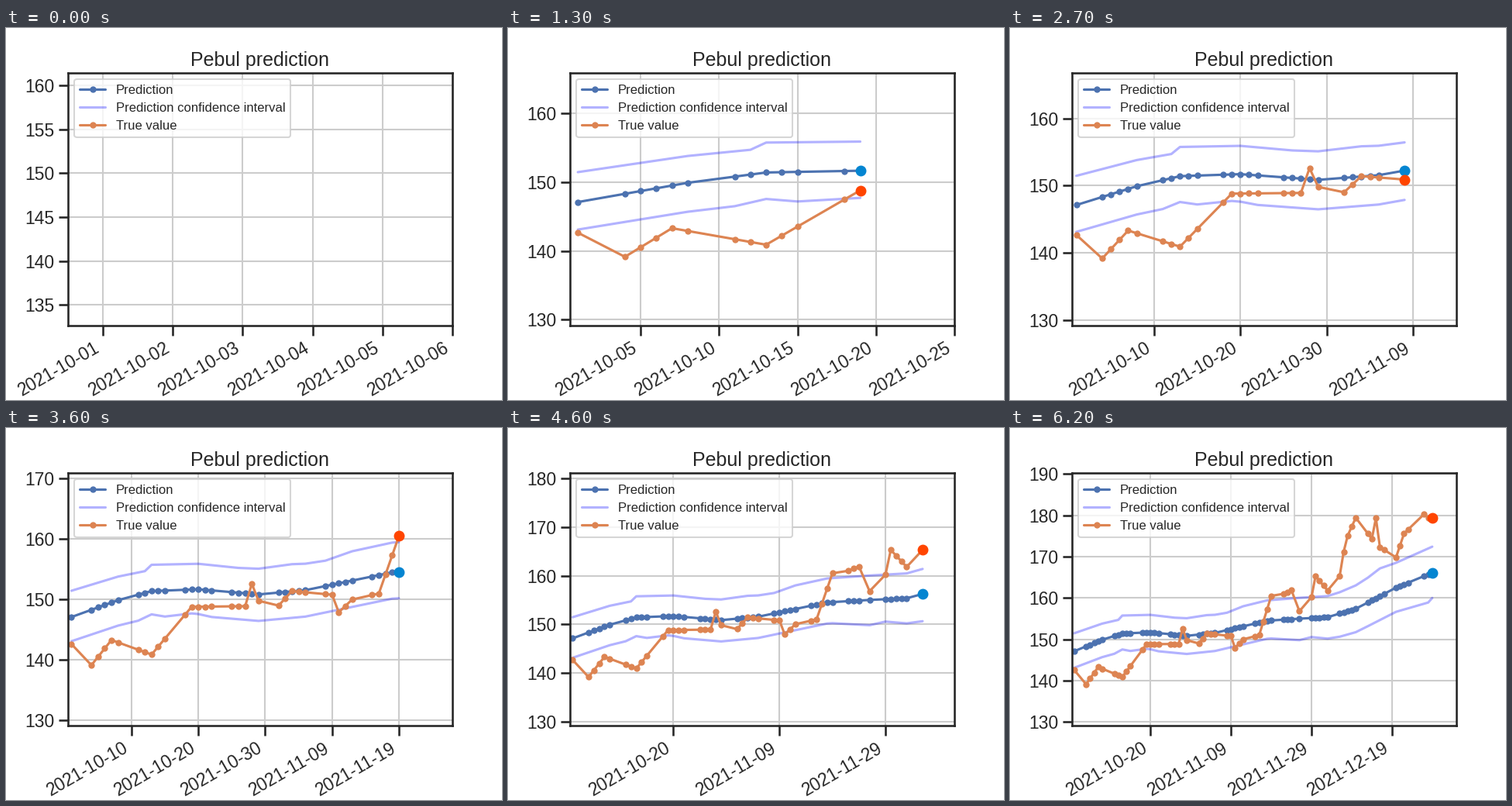
Write a matplotlib script that moves like this. It is 640 px wide and 480 px high and loops after 6.3 s.

```python
import numpy as np
import matplotlib.pyplot as plt
from matplotlib.animation import FuncAnimation
from matplotlib.dates import DateFormatter

INK = "0.15"
BLUE, ORANGE = "#4C72B0", "#DD8452"
N_FRAMES = 63

plt.rcParams.update({
    "font.family": "Liberation Sans",
    "text.color": INK,
    "axes.edgecolor": INK,
    "axes.linewidth": 1.875,
    "axes.titlesize": 18,
    "axes.grid": True,
    "axes.axisbelow": True,
    "grid.color": "0.8",
    "grid.linewidth": 1.5,
    "lines.linewidth": 2.25,
    "lines.markersize": 9,
    "lines.solid_capstyle": "round",
    "patch.linewidth": 1.5,
})
for side in ("xtick", "ytick"):
    plt.rcParams.update({
        f"{side}.color": INK,
        f"{side}.labelsize": 16.5,
        f"{side}.major.size": 9,
        f"{side}.major.width": 1.875,
    })

# Trading days as day numbers
days = np.busday_offset("2021-10-01", np.arange(N_FRAMES),
                        holidays=["2021-11-25", "2021-12-24"])
days = days.astype("datetime64[D]").astype(int)


def trace(*keys):
    """Straight runs between (days since the start, value) key points."""
    when, value = zip(*keys)
    return np.interp(days - days[0], when, value)


pred = trace((0, 147.1), (7, 149.9), (12, 151.4), (19, 151.7), (28, 150.85),
             (35, 151.55), (48, 154.5), (56, 155), (63, 155.35), (70, 157.4),
             (73, 158.9), (80, 162.5), (89, 166.1))
# The band is set by its distance above and below the prediction
upper = pred + trace((0, 4.35), (7, 3.9), (11, 3.6), (12, 4.35), (25, 4.1),
                     (33, 4.5), (38, 4.2), (42, 4.85), (66, 5.15), (73, 6),
                     (76, 6.7), (80, 6), (89, 6.3))
lower = pred - trace((0, 4), (10, 4.3), (12, 3.85), (14, 4.3), (18, 3.95),
                     (21, 4.4), (49, 4.35), (56, 5.2), (59, 4.6), (66, 5.6),
                     (80, 5.85), (88, 6.8), (89, 6.1))
# Turning points of the price
true = trace((0, 142.65), (3, 139.14), (6, 143.3), (12, 140.9), (18, 148.8),
             (26, 148.9), (27, 152.6), (28, 149.8), (31, 149), (33, 151.4),
             (39, 150.8), (40, 147.9), (42, 150), (46, 151), (49, 160.5),
             (52, 161), (54, 161.9), (56, 156.8), (59, 160.2), (60, 165.3),
             (63, 161.8), (66, 165.3), (67, 171.2), (68, 175.1), (70, 179.4),
             (74, 174.3), (75, 179.3), (76, 172.3), (80, 169.8), (82, 175.6),
             (87, 180.3), (88, 179.3))

fig, ax = plt.subplots(figsize=(6.4, 4.8), dpi=100)
ax.set_title("Pebul prediction")
ax.xaxis.set_major_formatter(DateFormatter("%Y-%m-%d"))
fig.autofmt_xdate()


def add_line(*args, **style):
    return ax.plot([], [], *args, **style)[0]


curves = [
    (add_line(".-", color=BLUE, ms=10, label="Prediction"), pred),
    (add_line(color="blue", alpha=0.3,
              label="Prediction confidence interval"), upper),
    (add_line(color="blue", alpha=0.3), lower),
    (add_line(".-", color=ORANGE, ms=10, label="True value"), true),
]
heads = [
    (add_line("o", color="#0485d1"), pred),
    (add_line("o", color="orangered"), true),
]
ax.legend(loc="upper left", fontsize=12)


def draw(n):
    for line, values in curves:
        line.set_data(days[:n], values[:n])
    for dot, values in heads:
        dot.set_data(days[n - 1:n], values[n - 1:n])
    # The view already makes room for the next day
    ax.set_xlim(days[0] - 0.5, days[n] + 5)
    seen = slice(n + 1)
    ax.set_ylim(min(true[seen].min(), lower[seen].min()) - 10,
                max(true[seen].max(), upper[seen].max()) + 10)
    return [line for line, _ in curves + heads]


anim = FuncAnimation(fig, draw, frames=N_FRAMES, interval=100,
                     repeat=True, repeat_delay=0)
plt.show()
```
